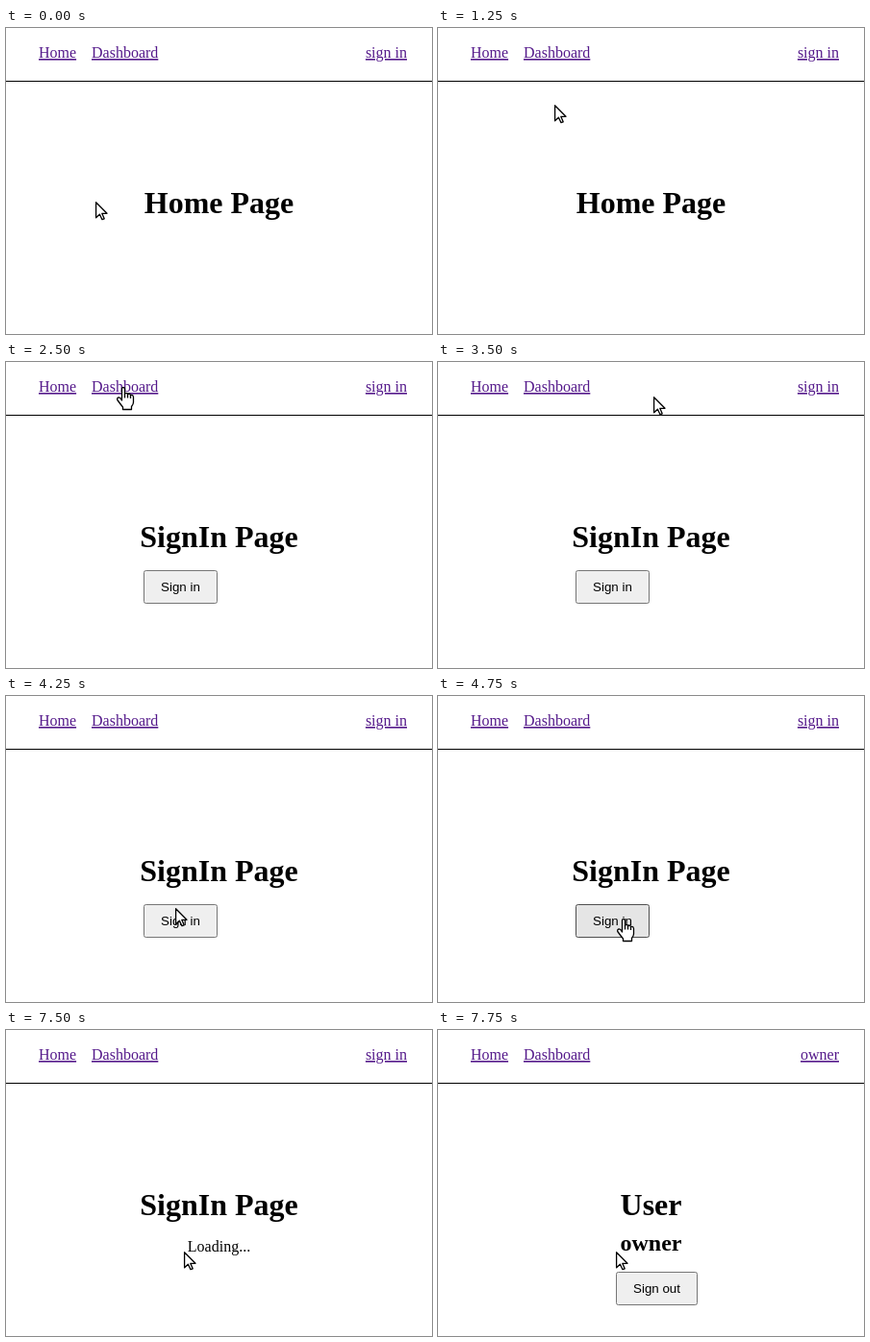
Write an HTML page that moves like this. It is 443 px wide and 319 px high and loops after 8000 ms.

```html
<!DOCTYPE html>
<html lang="en">
<head>
<meta charset="utf-8">
<title>Sign in flow</title>
<style>
html, body { margin: 0; width: 100%; height: 100%; overflow: hidden; background: #fff; }
svg { display: block; }
text { font: 16px "Liberation Serif", "Times New Roman", serif; }
.link { fill: #551a8b; text-decoration: underline 1px; text-underline-offset: 1px; }
.link.active { fill: #f00; }
.mid { text-anchor: middle; }
.h1 { font-size: 32px; font-weight: bold; }
.h2 { font-size: 24px; font-weight: bold; }
.button text { font: 13.333px "Liberation Sans", Arial, sans-serif; }
.button rect { fill: #efefef; stroke: #767676; }
.button.hover rect { fill: #e5e5e5; stroke: #4f4f4f; }
.button.active rect { fill: #f5f5f5; stroke: #8d8d8d; }
.cursor path { fill: #fff; stroke: #000; stroke-width: 1.3; stroke-linejoin: round; }
.cursor .lines { fill: none; }
</style>
</head>
<body>
<svg width="443" height="319" viewBox="0 0 443 319">
  <text class="link" x="34" y="31">Home</text>
  <text class="link" id="dashboard" x="89" y="31">Dashboard</text>
  <text class="link" id="account" x="417" y="31" text-anchor="end">sign in</text>
  <rect y="55" width="443" height="1"/>

  <text class="mid h1" id="title" x="221.5" y="193">Home Page</text>
  <g class="button" id="signIn">
    <rect x="143.5" y="217.5" width="76" height="34" rx="2"/>
    <text class="mid" x="181.5" y="239">Sign in</text>
  </g>
  <text class="mid" id="loading" x="221.5" y="231">Loading...</text>
  <g id="profile">
    <text class="mid h2" x="221.5" y="230">owner</text>
    <g class="button">
      <rect x="185.5" y="252.5" width="84" height="34" rx="2"/>
      <text class="mid" x="227.5" y="274">Sign out</text>
    </g>
  </g>

  <g class="cursor" id="arrow">
    <path d="M.6 .8V16.8L4.4 13.2 7 18.7 9.2 17.8 6.8 12.3H12Z"/>
  </g>
  <g class="cursor" id="hand">
    <path d="M5.5 14V2Q5.5 .5 7 .5T8.5 2V7.5Q8.5 6.3 10 6.3T11.5 8Q11.7 7 13 7T14.5 9Q14.8 8.2 16 8.3T17.5 10.5V16Q17.5 18 15.5 20.5V23.5H6.5V21Q4 18 .8 13.5Q.3 11.3 2 11T5.5 14Z"/>
    <path class="lines" d="M8.5 7V11.5M11.5 8V11.5M14.5 9V12"/>
  </g>
</svg>
<script>
const LOOP = 8000;
const $ = id => document.getElementById(id);
const show = (id, on) => $(id).style.display = on ? "" : "none";

// time, cursor, x, y
const moves = [
  [0, "arrow", 93, 181],
  [250, "arrow", 83, 162],
  [1250, "arrow", 121, 80],
  [1500, "hand", 120, 20],
  [1750, "hand", 117, 23],
  [2000, "hand", 115, 26],
  [3500, "arrow", 224, 36],
  [3750, "arrow", 267, 57],
  [4000, "arrow", 219, 125],
  [4250, "arrow", 176, 221],
  [4500, "hand", 178, 245],
  [4750, "hand", 186, 232],
  [5750, "arrow", 185, 231]
];

function draw(t) {
  const within = (a, b) => t >= a && t < b;
  const [, kind, x, y] = moves.findLast(m => m[0] <= t);
  for (const id of ["arrow", "hand"]) show(id, id === kind);
  $(kind).setAttribute("transform", `translate(${x} ${y})`);

  const signedIn = t >= 7750;
  $("title").textContent = t < 2500 ? "Home Page" : signedIn ? "User" : "SignIn Page";
  $("account").textContent = signedIn ? "owner" : "sign in";
  $("dashboard").classList.toggle("active", within(2250, 2500));
  $("signIn").classList.toggle("hover", within(4500, 5500));
  $("signIn").classList.toggle("active", within(5500, 5750));
  show("signIn", within(2500, 5750));
  show("loading", within(5750, 7750));
  show("profile", signedIn);
}

const start = performance.now();
function tick() {
  draw((performance.now() - start) % LOOP);
  requestAnimationFrame(tick);
}
tick();
</script>
</body>
</html>
```
